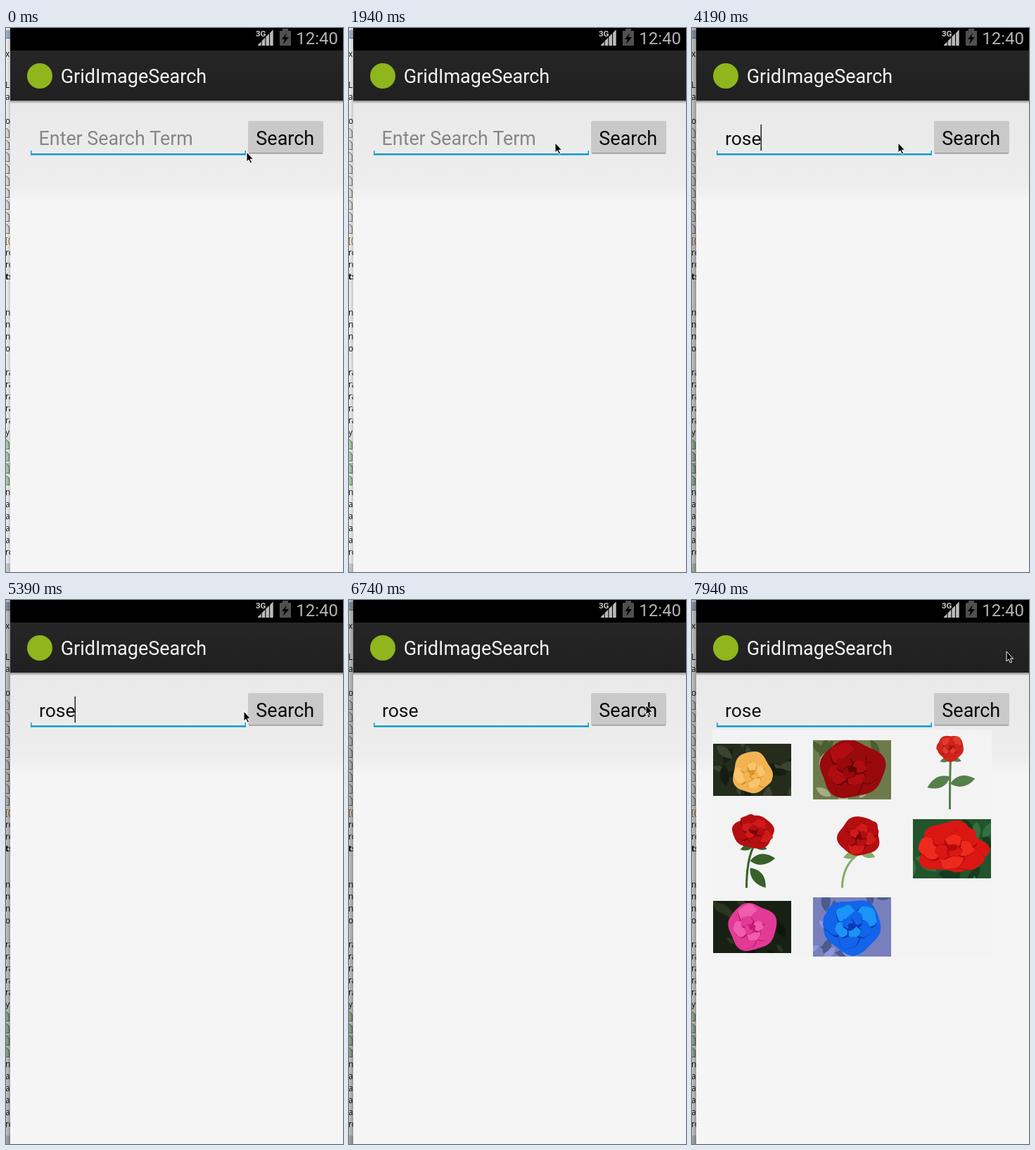
These frames come from a looping animation (479x772 px, 8 s). An HTML page with a canvas:

```html
<!DOCTYPE html>
<html lang="en">
<head>
<meta charset="utf-8">
<title>Image search</title>
<style>
html, body { margin: 0; width: 100%; height: 100%; overflow: hidden; background: #f5f5f5; }
canvas { display: block; }
</style>
</head>
<body>
<canvas id="stage" width="479" height="772"></canvas>
<script>
const ctx = document.getElementById('stage').getContext('2d');
const LOOP = 8000, STEP = 150;
const BLINK = 500;
const FONT = 'Roboto, sans-serif';

const TERM = 'rose';
const KEY_TIMES = [3290, 3740, 3890, 4190];
const PRESS_AT = 6140, RESULTS_AT = 6890;
const MOVES = [
  { from: 1340, to: 1940, x: 293, y: 163 },
  { from: 5090, to: 5840, x: 422, y: 149 },
  { from: 7490, to: 7940, x: 447, y: 73 }
];

const clamp = v => Math.min(1, Math.max(0, v));
const ease = v => v * v * (3 - 2 * v);
const snap = t => Math.floor((t + 10) / STEP) * STEP - 10;

function random(seed) {
  return () => (seed = (seed * 16807) % 2147483647) / 2147483647;
}

function rect(x, y, w, h, fill) {
  ctx.fillStyle = fill;
  ctx.fillRect(x, y, w, h);
}

function text(str, x, y, size, fill, weight = 400, family = FONT) {
  ctx.font = `${weight} ${size}px ${family}`;
  ctx.fillStyle = fill;
  ctx.fillText(str, x, y);
}

function gradient(x0, y0, x1, y1, ...colors) {
  const g = ctx.createLinearGradient(x0, y0, x1, y1);
  colors.forEach((c, i) => g.addColorStop(i / (colors.length - 1), c));
  return g;
}

function polygon(points, fill) {
  ctx.beginPath();
  points.forEach(([x, y]) => ctx.lineTo(x, y));
  ctx.closePath();
  ctx.fillStyle = fill;
  ctx.fill();
}

// Uneven rounded outline
function blob(x, y, rx, ry, rough, phase, fill) {
  const points = [];
  for (let a = 0; a < 6.28; a += 0.1) {
    const k = 1 - rough + rough * (Math.sin(3 * a + phase) + Math.sin(5 * a + 2 * phase)) / 2;
    points.push([x + rx * k * Math.cos(a), y + ry * k * Math.sin(a)]);
  }
  polygon(points, fill);
}

// Petals turn inward by the golden angle, each with a shaded rim
function blossom(x, y, rx, ry, [dark, mid, light], rough, phase) {
  blob(x, y, rx, ry, rough, phase, mid);
  for (let i = 0; i < 9; i++) {
    const a = phase + i * 2.4;
    const reach = 0.52 - i * 0.05, size = 0.46 - i * 0.03;
    const px = x + Math.cos(a) * rx * reach, py = y + Math.sin(a) * ry * reach;
    blob(px, py, rx * size, ry * size, 0.1, a, dark);
    blob(px + Math.cos(a) * 2, py + Math.sin(a) * 2 - 1, rx * (size - 0.03), ry * (size - 0.03), 0.1, a, i % 2 ? light : mid);
  }
  blob(x, y, rx * 0.14, ry * 0.12, 0.1, phase, dark);
}

function leaf(x, y, length, angle, fill) {
  ctx.save();
  ctx.translate(x, y);
  ctx.rotate(angle);
  ctx.beginPath();
  ctx.moveTo(0, 0);
  ctx.quadraticCurveTo(length * 0.45, -length * 0.45, length, 0);
  ctx.quadraticCurveTo(length * 0.45, length * 0.4, 0, 0);
  ctx.fillStyle = fill;
  ctx.fill();
  ctx.restore();
}

const RED = ['#780608', '#b50e11', '#d21a1a'];
const PHOTOS = [
  { h: 74, back: ['#252c1c', '#3a4530', '#171d12'], petals: ['#d98d2c', '#f2b452', '#f8c56a'], dy: 4, rx: 30, ry: 32 },
  { h: 84, back: ['#6d7b4c', '#4c5e32', '#a3ad86'], petals: ['#650406', '#990a0d', '#b00d12'], dy: -1, rx: 50, ry: 44 },
  { petals: ['#a41612', '#cf241c', '#e23a2c'], dx: -2, dy: -31, rx: 20, ry: 20, foot: -3, green: '#557f4b', leaves: [2.7, -0.2] },
  { petals: RED, dx: 2, dy: -23, rx: 32, ry: 25, foot: -8, green: '#38602a', leaves: [-0.1, 0.9] },
  { petals: RED, dx: 10, dy: -17, rx: 32, ry: 30, foot: -14, green: '#86ac68', leaves: [] },
  { h: 84, back: ['#22552c', '#337141', '#163c20'], petals: ['#b00c0c', '#da1713', '#ee2a1e'], dy: -1, rx: 55, ry: 43, rough: 0.17 },
  { h: 74, back: ['#182014', '#2a361f', '#0f150c'], petals: ['#bf1b72', '#e23a96', '#f05cae'], rx: 37, ry: 36 },
  { h: 84, back: ['#777fbd', '#9096dc', '#4d5a90'], petals: ['#0838b4', '#1264ea', '#1a94f6'], dy: -1, rx: 44, ry: 42 }
];

function backdrop(x, y, w, h, [base, ...tones], seed) {
  const rnd = random(seed);
  rect(x, y, w, h, base);
  for (let i = 0; i < 20; i++) {
    leaf(x + rnd() * w, y + rnd() * h, 14 + rnd() * 18, rnd() * 6.3, tones[i % tones.length]);
  }
}

function stalk(x, y, footX, footY, ry, green, leaves) {
  const top = y + ry * 0.8;
  const midY = top + (footY - top) * 0.35;
  ctx.beginPath();
  ctx.moveTo(x, top);
  ctx.quadraticCurveTo(footX, midY, footX, footY);
  ctx.strokeStyle = green;
  ctx.lineWidth = 3;
  ctx.stroke();
  leaves.forEach((a, i) => leaf((x + footX) / 2, midY + i * 10, 36, a, green));
  [0.3, 2.8].forEach(a => leaf(x, top - 2, ry * 0.8, a, green));
}

function photo({ h, back, petals, dx = 0, dy = 0, rx, ry, foot, green, leaves, rough = 0.08 }, i) {
  const cx = 85.5 + 142 * (i % 3), cy = 241 + 111.5 * Math.floor(i / 3);
  const x = cx + dx, y = cy + dy;
  ctx.save();
  ctx.beginPath();
  ctx.rect(Math.round(cx - 56), Math.round(cy - (h || 112) / 2), 111, h || 112);
  ctx.clip();
  if (back) backdrop(cx - 56, cy - h / 2 - 1, 112, h + 2, back, 11 + i * 16);
  else stalk(x, y, cx + foot, cy + 56, ry, green, leaves);
  blossom(x, y, rx, ry, petals, rough, i * 1.3 + 0.5);
  ctx.restore();
}

function pageIcon(y, fill, edge) {
  const sheet = d => [[-2, y - 7 + d], [1, y - 7 + d], [5 - d, y - 3 + d], [5 - d, y + 7 - d], [-2, y + 7 - d]];
  polygon(sheet(0), edge);
  polygon(sheet(1), fill);
}

// Sliver of the editor behind the phone window; "*" and "+" are page icons
const ROWS = 'L ag . or * * * * * * * * * [( ro ro ts . . ne ne ne or . ra ra ra ra ra y + + + + ne al al al al ro'.split(' ');

function editor(shade) {
  rect(0, 0, 6, 772, '#fafafa');
  rect(0, 3, 6, 11, '#a8b8d6');
  rect(0, 14, 6, 1, '#777');
  rect(0, 617, 6, 16, '#cfcfcf');
  rect(0, 760, 6, 12, '#d5d5d5');
  const label = (str, y) => text(str, -1, y + 4, 12,
    str === '[(' ? '#a06b20' : '#111', str === 'ts' ? 700 : 400, '"Open Sans", sans-serif');
  label('x', 37);
  ROWS.forEach((row, i) => {
    const y = 81 + 17 * i;
    if (row === '*') pageIcon(y, '#dfe5f0', '#8f7350');
    else if (row === '+') pageIcon(y, '#b4d2ae', '#5b8a68');
    else if (row !== '.') label(row, y);
  });
  rect(0, 0, 6, 772, gradient(0, 0, 6, 0,
    `rgba(0,0,0,${0.03 + 0.19 * shade})`, `rgba(0,0,0,${0.2 + 0.2 * shade})`));
}

function statusBar() {
  rect(6, 0, 473, 32, '#000');
  text('3G', 355, 12, 11.5, '#ccc', 700);
  for (let i = 0; i < 4; i++) {
    const x = 358 + i * 5.7, w = 4.6, top = 24 - i * 5.7;
    polygon([[x, 25], [x, top], [x + w, top - w], [x + w, 25]], '#bbb');
  }
  rect(393, 1, 8, 4, '#505050');
  rect(389, 4, 16, 21, '#505050');
  polygon([[399, 7], [392, 16], [396, 16], [394, 23], [402, 13], [397, 13]], '#000');
  text('12:40', 412.3, 23, 24, '#b4b4b4');
}

function actionBar() {
  rect(6, 32, 473, 71, gradient(0, 32, 0, 103, '#262626', '#202020'));
  rect(6, 103, 473, 4, gradient(0, 103, 0, 107, '#8c8c8c', '#e4e4e4'));
  ctx.beginPath();
  ctx.arc(48, 68, 18, 0, 7);
  ctx.fillStyle = '#8fb61c';
  ctx.fill();
  text('GridImageSearch', 77.7, 78, 27, '#f3f3f3');
}

function searchRow(t) {
  const typed = TERM.slice(0, KEY_TIMES.filter(k => t >= k).length);
  if (typed) text(typed, 47, 166, 26.5, '#111');
  else text('Enter Search Term', 46.6, 166, 26.8, '#868686');

  const typing = t >= KEY_TIMES[0] && t < KEY_TIMES[3];
  const phase = t < KEY_TIMES[0] ? 340 : 4150;
  if (typing || Math.floor((t - phase) / BLINK) % 2 === 0) {
    ctx.font = `26.5px ${FONT}`;
    rect(Math.round(46.5 + ctx.measureText(typed).width) - 0.5, 137, 1.5, 37, '#222');
  }
  rect(35, 178, 306, 2.5, '#129bcb');
  for (const x of [35, 339.5]) rect(x, 174, 1.5, 5, '#129bcb');

  const pressed = t < PRESS_AT ? 0 : 1 - clamp((snap(t) - PRESS_AT) / (2 * STEP));
  const gray = 201 - 22 * pressed;
  ctx.beginPath();
  ctx.roundRect(344, 132, 107, 46, 2);
  ctx.fillStyle = `rgb(${gray}, ${gray}, ${gray})`;
  ctx.fill();
  rect(345, 177, 105, 1.5, '#969696');
  text('Search', 355.3, 166, 27, '#080808');
}

function pointer(t) {
  let x = 342, y = 176;
  for (const m of MOVES) {
    const k = ease(clamp((snap(t) - m.from) / (m.to - m.from)));
    x += (m.x - x) * k;
    y += (m.y - y) * k;
  }
  ctx.save();
  ctx.translate(Math.round(x), Math.round(y));
  polygon([[0, 0], [0, 14], [3, 11], [5.4, 16], [7.6, 15], [5.3, 10.2], [9.6, 10.2]], '#000');
  ctx.strokeStyle = '#fff';
  ctx.lineWidth = 1;
  ctx.lineJoin = 'round';
  ctx.stroke();
  ctx.restore();
}

function draw(t) {
  editor(clamp((snap(t) - 1940) / 300));
  rect(6, 0, 473, 772, '#f5f5f5');
  rect(6, 103, 473, 117, gradient(0, 103, 0, 220, '#e9e9e9', '#ededed'));
  rect(6, 220, 473, 28, gradient(0, 220, 0, 248, '#ededed', '#f5f5f5'));
  statusBar();
  actionBar();
  searchRow(t);
  if (t >= RESULTS_AT) {
    rect(29, 184, 397, 322, '#f3f3f3');
    PHOTOS.forEach(photo);
  }
  pointer(t);
}

const start = performance.now();
function tick() {
  draw((performance.now() - start) % LOOP);
  requestAnimationFrame(tick);
}
tick();
</script>
</body>
</html>
```
